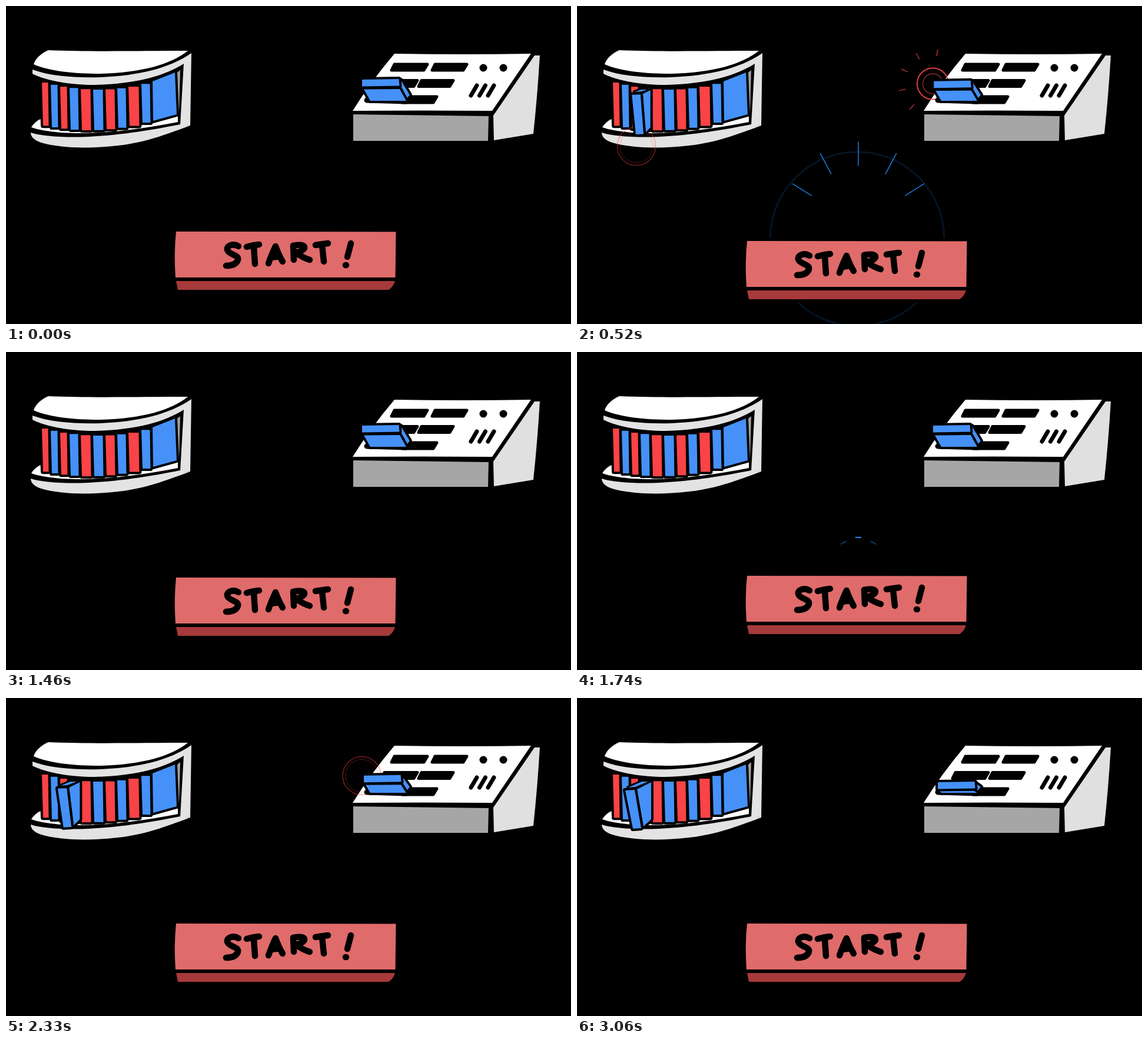
Recreate the animation shown at these times as an HTML page with a canvas. Size 960 by 540 pixels, loop 3090 ms.

```html
<!DOCTYPE html>
<html lang="en">
<head>
<meta charset="utf-8">
<title>Start!</title>
<style>
html, body { margin: 0; width: 100%; height: 100%; overflow: hidden; background: #000; }
canvas { display: block; }
</style>
</head>
<body>
<canvas id="stage" width="960" height="540"></canvas>
<script>
const ctx = document.getElementById('stage').getContext('2d');
const BLUE = '#4591f7', RED = '#fa4347', RAY = '#2490ff', LOOP = 3090;
ctx.lineJoin = 'round';

const clamp = v => Math.max(0, Math.min(1, v));
const span = (t, from, to) => clamp((t - from) / (to - from));
const smooth = u => u * u * (3 - 2 * u);
const settle = (age, pace) => 1 - Math.exp(-age / pace);
const poly = points => 'M' + points.join(' ') + 'Z';

function fill(d, color) {
  ctx.fillStyle = color;
  ctx.fill(new Path2D(d));
}

function stroke(d, width, color = '#000', cap = 'round') {
  ctx.lineWidth = width;
  ctx.strokeStyle = color;
  ctx.lineCap = cap;
  ctx.stroke(new Path2D(d));
}

// A coloured shape with a black outline outside its edge
function inked(points, color, ink = 4) {
  stroke(poly(points), ink * 2);
  fill(poly(points), color);
}

function ring(x, y, r, width, color, alpha) {
  ctx.globalAlpha = clamp(alpha);
  ctx.lineWidth = width;
  ctx.strokeStyle = color;
  ctx.beginPath();
  ctx.arc(x, y, r, 0, Math.PI * 2);
  ctx.stroke();
  ctx.globalAlpha = 1;
}

// One ray around a centre; degrees run clockwise from straight up
function ray(x, y, deg, from, to, width, color, squash = 1) {
  const s = Math.sin(deg * Math.PI / 180) * squash, c = Math.cos(deg * Math.PI / 180);
  stroke(`M${x + s * from} ${y - c * from}L${x + s * to} ${y - c * to}`, width, color, 'butt');
}

const spines = [61, 76, 92, 108, 127, 148, 169, 189, 208, 230, 249];

function shelf() {
  fill('M72 75C140 78 230 76 309 76C280 99 232 113 160 115C115 115 75 111 47 99C50 89 60 80 72 75Z', '#fff');
  fill('M45 108C75 119 115 122 160 121C225 118 275 107 315 80L313 203L296 202L302 98C270 118 225 132 150 134C110 134 68 127 45 115Z', '#e3e3e3');
  fill('M43 206C46 200 54 193 62 191L292 181L292 197C240 207 180 216 125 216C90 216 60 212 43 206Z', '#fff');
  fill('M42 215C60 221 100 224 140 222C200 219 250 210 296 201L313 203C285 213 240 232 190 237C140 243 90 241 60 232C48 228 42 222 42 215Z', '#e3e3e3');
  fill('M62 131C110 142 230 143 300 100L296 186L250 199L68 206Z', '#000');
  fill('M291 113L296 109L294 180L292 183Z', '#a3a3a3');
  for (let i = 0; i < 10; i++) {
    const x = spines[i], right = spines[i + 1] - 4.5;
    const top = 142 - (x - 150) ** 2 / 660, foot = 211 - (x - 135) ** 2 / 700;
    inked([x, top, right, top, right + 1, foot, x + 2, foot], i % 2 ? BLUE : RED);
  }
  inked([249, 128, 287, 113, 290, 184, 250, 195], BLUE);
}

const shut = [107, 143, 120, 143, 118, 213, 106, 213];
const open = [82, 157, 98, 156, 109, 221, 95, 222];

function pulledBook(t) {
  const p = span(t, 150, 820);
  if (!p) return;
  const front = shut.map((v, i) => v + (open[i] - v) * p);
  const [ax, ay, bx, by, cx, cy] = front, far = 121 + 5 * Math.sqrt(p);
  const side = [bx + 4, by - 1, far, 143, far, 206, cx + 4, cy - 3];
  inked(side, BLUE);
  if (p > .4) {
    inked([ax + 5, ay - 5, bx + 1, by - 5, far - 5, 142, far - 16, 142], BLUE, 3);
    inked(side, BLUE, 3);
  }
  inked(front, BLUE);
}

function slot(x, y, w) {
  const d = poly([x + 6, y + 2, x + w, y + 2, x + w - 6, y + 12, x + 1, y + 12]);
  fill(d, '#000');
  stroke(d, 5);
}

function machine() {
  fill('M660 81Q780 83 892 81Q860 128 826 178Q705 177 589 178Q620 128 660 81Z', '#fff');
  fill('M590 184L820 187L819 229L590 229Z', '#a6a6a6');
  fill('M898 84L907 84Q903 152 896 217L829 228L828 186Z', '#e0e0e0');
  for (let row = 0; row < 3; row++) {
    const x = 654 - 17 * row, y = 97 + 27.5 * row;
    if (row < 2) slot(x, y, 62);
    slot(x + 69 - 6 * row + (row > 1 ? -5 : 0), y, 60);
  }
  stroke('M811 105h.1M845 105h.1', 13);
  for (let i = 0; i < 3; i++) stroke(`M${800 + 14.5 * i} 135l-10 17`, 7);
}

function cartridge(t) {
  const d = 18 * smooth(span(t, 310, 1150));
  const x = 605 + d * .45, y = 125 + d, w = 62.5, low = 141.5 + d * .92, edge = 671 + d * .3;
  stroke('M613 160L680 162', 9);
  inked([edge, y + 1, 686, 151, 681, 157, edge, y + 14], BLUE);
  inked([x + 3, low, edge - 2, low - .5, 680, 161, 619, 161], BLUE);
  inked([x, y, x + w, y - 1, x + w + 1, y + 10.5, x, y + 11.5], BLUE);
}

// Two red rings and a fan of short rays; flip mirrors the fan downwards
function click(x, y, age, flip) {
  if (age <= 0 || age > 360) return;
  const alpha = clamp((360 - age) / 200), width = 2.2 - age / 200;
  ring(x, y, 33 * settle(age, 55), width, RED, alpha);
  ring(x, y, 33 * settle(age, 125), width * .8, RED, alpha * .6);
  const from = 31 + age * .18, to = 62 * settle(age, 30);
  for (let i = 0; i < 5 && to > from; i++) {
    const deg = 8 - 36.5 * i;
    ray(x, y, flip ? 180 - deg : deg, from, to, 1.2, '#d53a3e');
  }
}

// A widening blue ring with five rays that grow thin and long
function pressBurst(t) {
  const r = Math.max(0, (t - 100) * .352);
  ring(471 + r / 29, 395.5, r, 3, RAY, .14 * (1 - span(t, 540, 650)));
  ctx.globalAlpha = 1 - span(t, 540, 650);
  for (let i = -2; i <= 2; i++) {
    const u = (t - 60 - 6 * Math.abs(i)) / 455;
    if (u <= 0) continue;
    const from = 54 + 46 * u ** .8, grow = 1 - (1 - clamp(u)) ** 2.2;
    ray(478, 372, i * 30, from, from + 41 * grow, 11 * Math.exp(-2.1 * u), RAY, .92);
  }
  ctx.globalAlpha = 1;
}

function button(t) {
  const recoil = 3 * Math.sin(Math.PI * span(t, 0, 140));
  const push = 16 * smooth(span(t, 70, 410)) * (1 - smooth(span(t, 520, 660)));
  ctx.save();
  ctx.translate(0, push - recoil);
  inked([289, 383, 662, 383, 661, 480, 650, 482, 292, 482, 288, 461], '#000', 5);
  fill('M289 383L662.5 383.5L661.5 461L288 461Q285 421 289 383Z', '#e06b6b');
  fill('M289 467L661 467Q658 477 650 482L292 482Z', '#a73a3b');
  stroke('M395 408C385 402 372 408 377 416C382 423 396 423 394 431C391 440 381 441 374 441' +
    'M409 409Q420 406 430 405M421 408L423 438' +
    'M446 437Q452 420 458 408Q464 424 470 434M451 427L465 425' +
    'M488 407L489 431M488 407C512 402 513 414 493 419Q503 427 516 431' +
    'M526 406L547 403M537 406L540 434M586 403L580 426M577 440h1', 10.5);
  ctx.restore();
}

function draw(t) {
  ctx.fillStyle = '#000';
  ctx.fillRect(0, 0, 960, 540);
  shelf();
  click(101, 238, t - 283, true);
  pulledBook(t);
  machine();
  click(604.5, 132, t - 430, false);
  cartridge(t);
  pressBurst(t);
  button(t);
}

// Poses hold for 70 ms, every fifth of ten for 100 ms
function held(t) {
  const block = Math.floor(t / 730), rest = t - block * 730;
  const step = rest < 280 ? Math.floor(rest / 70) : rest < 380 ? 4 : Math.floor((rest - 30) / 70);
  return block * 730 + step * 70 + (step > 4 ? 30 : 0);
}

// The action restarts at 1460 ms after a short rest
const start = performance.now();
function frame() {
  const t = held((performance.now() - start) % LOOP);
  draw(t < 1460 ? t : Math.max(0, t - 1670));
  requestAnimationFrame(frame);
}
frame();
</script>
</body>
</html>
```
